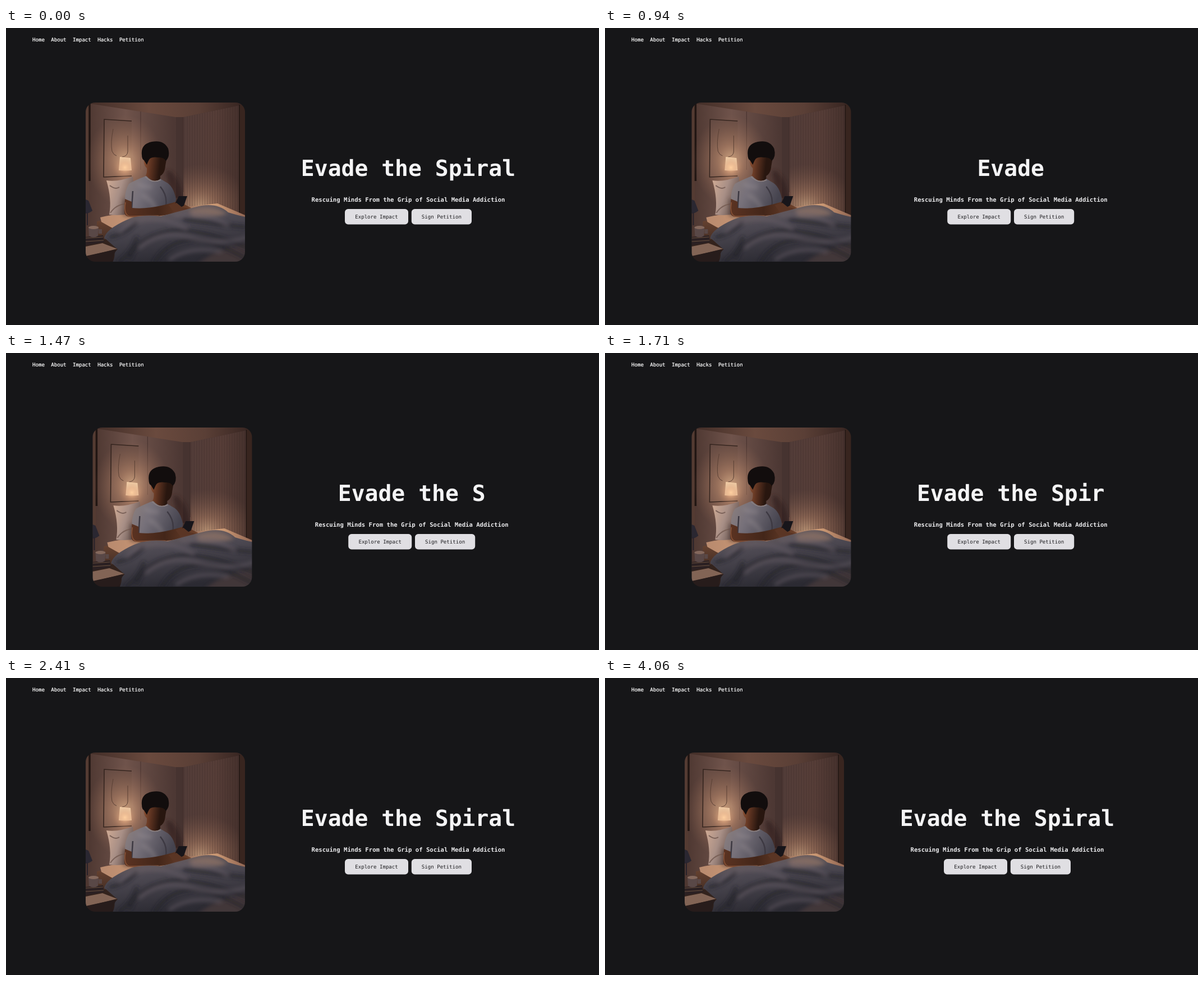
Animation of 1057 by 530 pixels, one loop 4.12 s. Source, as an HTML page:

```html
<!DOCTYPE html>
<html lang="en">
<head>
<meta charset="utf-8">
<title>Landing page</title>
<style>
  html, body { margin: 0; width: 100%; height: 100%; overflow: hidden; background: #161618; }
  svg { display: block; width: 1057px; height: 530px; }
  text { font-family: "DejaVu Sans Mono", monospace; font-size: 9.08px; fill: #f4f4f5; text-rendering: geometricPrecision; }
  #nav text { fill: #fff; stroke: #fff; stroke-width: .22px; }
  .middle text { text-anchor: middle; }
  #title { font-size: 39.7px; font-weight: bold; }
  .tagline { font-size: 10.62px; font-weight: bold; fill: #ececee; }
  .button rect { fill: #e0dfe3; }
  .button text { fill: #1c1c1f; }
</style>
</head>
<body>
<svg viewBox="0 0 1057 530">
  <defs>
    <clipPath id="card"><rect width="284" height="284" rx="17"/></clipPath>
    <linearGradient id="leftWall" x2="1" y2="0"><stop stop-color="#4c3630"/><stop offset=".25" stop-color="#6f534b"/><stop offset=".55" stop-color="#4d3834"/><stop offset="1" stop-color="#49342f"/></linearGradient>
    <linearGradient id="rightWall" x2="1" y2="0"><stop stop-color="#533d39"/><stop offset=".5" stop-color="#573e38"/><stop offset="1" stop-color="#402d29"/></linearGradient>
    <linearGradient id="ceiling" x2="1" y2="0"><stop stop-color="#3d2a25"/><stop offset=".4" stop-color="#6a4a3e"/><stop offset=".7" stop-color="#5a3f36"/><stop offset="1" stop-color="#33221f"/></linearGradient>
    <radialGradient id="glow"><stop stop-color="#ffd0a0" stop-opacity=".95"/><stop offset=".35" stop-color="#dca27c" stop-opacity=".6"/><stop offset="1" stop-color="#a07058" stop-opacity="0"/></radialGradient>
    <linearGradient id="pillow" x2="1" y2=".4"><stop stop-color="#d2ac95"/><stop offset=".5" stop-color="#a88f86"/><stop offset="1" stop-color="#5d4c49"/></linearGradient>
    <linearGradient id="sheet" x2="1" y2="0"><stop stop-color="#b88a6e"/><stop offset=".25" stop-color="#c79574"/><stop offset=".55" stop-color="#8a6555"/><stop offset=".75" stop-color="#d6a27a"/><stop offset="1" stop-color="#8c6250"/></linearGradient>
    <linearGradient id="shirt" x2="1" y2=".35"><stop stop-color="#8d807e"/><stop offset=".4" stop-color="#77717a"/><stop offset="1" stop-color="#45434e"/></linearGradient>
    <linearGradient id="skin" x2="1" y2=".15"><stop stop-color="#8f5233"/><stop offset=".4" stop-color="#58301f"/><stop offset=".75" stop-color="#28160f"/></linearGradient>
    <linearGradient id="arm" x2="1" y2="0"><stop stop-color="#5b3322"/><stop offset=".5" stop-color="#432619"/><stop offset="1" stop-color="#6e422c"/></linearGradient>
    <linearGradient id="blanket" x2=".3" y2="1"><stop stop-color="#7b6a68"/><stop offset=".4" stop-color="#4d4952"/><stop offset="1" stop-color="#2b2a32"/></linearGradient>
    <linearGradient id="floor" x2="0" y2="1"><stop stop-color="#6b4532"/><stop offset="1" stop-color="#241a19"/></linearGradient>
    <pattern id="ribs" width="4.5" height="10" patternUnits="userSpaceOnUse"><path d="M1 0V10" stroke="#2b1c19" stroke-opacity=".3"/></pattern>
    <filter id="soft"><feGaussianBlur stdDeviation=".5"/></filter>
    <filter id="blur" x="-50%" y="-50%" width="200%" height="200%"><feGaussianBlur stdDeviation="3.5"/></filter>
  </defs>

  <g id="nav"></g>

  <g id="picture"><g clip-path="url(#card)">
    <g filter="url(#soft)">
      <!-- room -->
      <rect width="284" height="284" fill="url(#leftWall)"/>
      <path d="M174 26L289 2V230H174Z" fill="url(#rightWall)"/>
      <ellipse cx="204" cy="185" rx="88" ry="75" fill="url(#glow)" opacity=".6"/>
      <path d="M174 26L284 2V230H174Z" fill="url(#ribs)"/>
      <path d="M-5-5H289V2L174 26H160L8 2Z" fill="url(#ceiling)"/>
      <path d="M161 26H174V170H161Z" fill="#463330"/>
      <path d="M174 26V160M98 16V120" stroke="#3c2a27" fill="none" opacity=".7"/>
      <path d="M274 4H289V220H274Z" fill="#38251f"/>
      <path d="M274 4V206" stroke="#211613" stroke-width="1.5"/>
      <path d="M0 0H6V190H0Z" fill="#543b32"/>
      <path d="M7 0V140" stroke="#211613" stroke-width="3.5"/>
      <path d="M34 30L82 33V132L32 133Z" fill="#654b43"/>
      <ellipse cx="70" cy="104" rx="68" ry="82" fill="url(#glow)" opacity=".72"/>
      <path d="M82 33L33 30L32 133L82 131" fill="none" stroke="#35251f" stroke-width="1.6"/>
      <path d="M49 47Q44 72 47 87Q50 94 55 95M75 59V88Q74 96 65 97" fill="none" stroke="#5a4035"/>
      <path d="M61 97L80 99L82 121Q70 122 59 121Z" fill="#ffdfb6"/>
      <ellipse cx="70" cy="116" rx="24" ry="24" fill="url(#glow)"/>
      <path d="M144 120Q170 128 174 178L150 186Z" fill="#2d1f1d" opacity=".65" filter="url(#blur)"/>
      <!-- bed -->
      <path d="M20 212L60 204V284H20Z" fill="url(#floor)"/>
      <path d="M26 205Q65 196 120 195L180 186L235 180L289 203V230H60Q43 222 28 213Z" fill="url(#sheet)"/>
      <path d="M37 139Q58 142 84 132L91 196Q65 203 42 200Q47 173 37 139Z" fill="url(#pillow)"/>
      <path d="M44 197Q54 182 71 181M43 148Q53 156 60 151" fill="none" stroke="#7b6259" stroke-width="2"/>
      <path d="M70 172L70 200L95 203" fill="none" stroke="#4b352e" stroke-width="7" opacity=".6" filter="url(#blur)"/>
      <!-- person -->
      <path d="M104 100Q103 110 107 115L109 117Q110 126 106 132Q117 145 133 138V131Q141 127 142 113L145 96L130 84H108Z" fill="url(#skin)"/>
      <path d="M100 93Q98 74 118 70Q139 66 147 82Q151 96 143 104Q139 97 129 98Q115 96 112 104L109 111L104 103Q100 101 100 93Z" fill="#120d0d"/>
      <path d="M108 131Q89 138 77 145Q70 157 70 173L82 178L80 200Q120 205 158 190L161 172Q156 148 143 142L133 136Q122 146 108 131Z" fill="url(#shirt)"/>
      <path d="M106 132Q118 145 134 138" fill="none" stroke="#8d8180" stroke-width="1.5"/>
      <path d="M84 158L82 190M133 150Q146 166 143 184" fill="none" stroke="#3d3942" stroke-width="2.5"/>
      <path d="M92 145Q105 152 118 150M100 165Q117 172 125 190" fill="none" stroke="#a0979a" stroke-width="7" opacity=".3" filter="url(#blur)"/>
      <path d="M70 172L82 177L82 188Q108 191 143 182L165 176L188 188Q176 199 153 199Q108 207 78 204Q67 203 69 190Z" fill="url(#arm)"/>
      <path d="M71 178Q67 200 78 203L130 202" fill="none" stroke="#8a5438" stroke-width="1.5"/>
      <path d="M166 167L181 167L175 184Q167 190 158 183Z" fill="#17151a"/>
      <path d="M148 183L162 179L172 187L188 190L184 195L158 197Z" fill="#5a3524"/>
      <!-- blanket -->
      <path d="M33 242Q36 226 74 209Q96 199 134 203Q167 194 194 187Q232 176 254 196Q277 203 289 205V289H46Q62 261 33 242Z" fill="url(#blanket)"/>
      <path d="M184 193Q225 178 252 199Q230 206 190 203Z" fill="#9c7c6b" opacity=".6" filter="url(#blur)"/>
      <path d="M200 289Q225 263 289 251V289Z" fill="#54423f" opacity=".55" filter="url(#blur)"/>
      <g fill="none" stroke-linecap="round" filter="url(#blur)">
        <path d="M44 240Q72 235 90 214M79 278Q91 243 142 231T289 259M123 285Q142 252 180 246T289 280M60 284Q82 267 91 242M176 209Q217 216 284 222" stroke="#1f1f28" stroke-width="6" opacity=".75"/>
        <path d="M61 231Q82 206 120 208Q153 209 179 225M96 259Q135 226 189 241T289 240M159 202Q216 192 253 219M150 280Q185 255 240 266" stroke="#6c626a" stroke-width="5" opacity=".6"/>
      </g>
      <!-- bedside table -->
      <path d="M0 250L36 244L57 262L30 289H0Z" fill="#33231d"/>
      <path d="M0 257L30 251L56 261L0 275Z" fill="#826455"/>
      <path d="M0 274L55 262L42 289H0Z" fill="#271c1b"/>
      <path d="M0 240L31 237L33 249L0 255Z" fill="#2b2022"/>
      <path d="M0 242L31 240M0 248L32 246" stroke="#69503f" stroke-width="1.2"/>
      <path d="M5 222Q14 218 23 222L22 238Q13 243 6 238ZM23 226H29V234H23" fill="#594847"/>
      <ellipse cx="14" cy="223" rx="9" ry="3" fill="#84685c"/>
      <path d="M0 173L5 175L12 193Q6 198 0 198Z" fill="#2a2731"/>
      <path d="M3 196V219" stroke="#29222a" stroke-width="2"/>
    </g>
  </g></g>

  <g id="copy" class="middle">
    <text id="title" y="264"></text>
    <text class="tagline" y="310">Rescuing Minds From the Grip of Social Media Addiction</text>
    <g class="button"><rect x="-113" y="323" width="113" height="27.5" rx="5.7"/><text x="-56.5" y="340">Explore Impact</text></g>
    <g class="button"><rect x="5.8" y="323" width="107.2" height="27.5" rx="5.7"/><text x="59.4" y="340">Sign Petition</text></g>
  </g>
</svg>
<script>
  const LOOP = 4120, TYPE_START = 300, CHAR_TIME = 100;
  const HEADLINE = "Evade the Spiral";
  const CHAR_WIDTH = 23.9, TAGLINE_WIDTH = 345.2;
  const byId = id => document.getElementById(id);

  let navX = 47;
  for (const label of ["Home", "About", "Impact", "Hacks", "Petition"]) {
    const item = document.createElementNS("http://www.w3.org/2000/svg", "text");
    item.setAttribute("x", navX);
    item.setAttribute("y", 24.4);
    item.textContent = label;
    byId("nav").append(item);
    navX += label.length * 5.466 + 11.4;
  }

  function render(now) {
    const typed = Math.floor((now % LOOP - TYPE_START) / CHAR_TIME);
    // The finished headline stays up until typing restarts.
    const headline = (typed < 1 ? HEADLINE : HEADLINE.slice(0, typed)).trimEnd();
    byId("title").textContent = headline;

    // Evenly spaced columns: free width is shared between three gaps.
    const fullWidth = HEADLINE.length * CHAR_WIDTH;
    const freed = fullWidth - Math.max(TAGLINE_WIDTH, headline.length * CHAR_WIDTH);
    byId("picture").setAttribute("transform", `translate(${142 + freed / 3} 133)`);
    byId("copy").setAttribute("transform", `translate(${717 + freed / 6} 0)`);
  }

  const start = performance.now();
  function tick() {
    render(performance.now() - start);
    requestAnimationFrame(tick);
  }
  tick();
</script>
</body>
</html>
```
